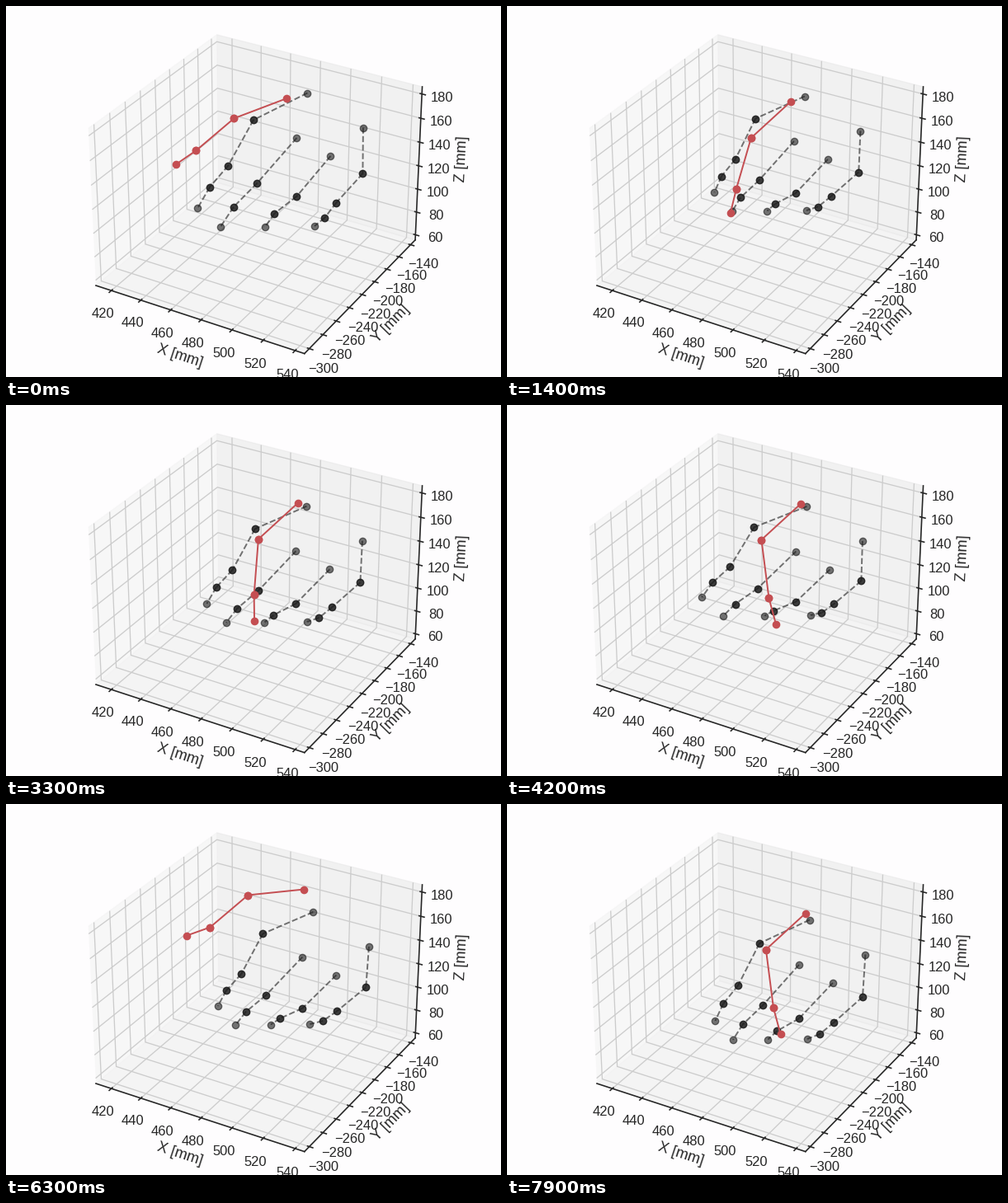
Write a matplotlib script that moves like this. It is 600 px wide and 450 px high and loops after 8 s.

```python
import numpy as np
import matplotlib.pyplot as plt
from matplotlib.animation import FuncAnimation

INK = "0.15"
SCALE = 1.15
plt.rcParams.update({
    "font.family": "Liberation Sans", "text.color": INK,
    "axes.labelcolor": INK, "axes.edgecolor": INK,
    "xtick.color": INK, "ytick.color": INK,
    "axes.linewidth": 1.25, "xtick.major.width": 1.25, "ytick.major.width": 1.25,
    "grid.color": "0.8", "grid.linewidth": 1, "grid.linestyle": "-",
    "axes.labelsize": 12 * SCALE,
    "xtick.labelsize": 11 * SCALE, "ytick.labelsize": 11 * SCALE,
})

W, H, DPI = 600, 450, 93.75
FRAMES, STEP, BEAT = 80, 100, 900

# Rest shape of each finger, knuckle to tip, as x + y*1j in pixels,
# with the direction its tip moves when the hand spreads.
FINGERS = [
    ([366 + 122.5j, 305 + 152j, 279 + 204j, 261 + 227j, 251 + 249j], -1.5),
    ([353 + 177j, 309 + 227.5j, 284.5 + 252j, 272.5 + 272j], -1),
    ([394 + 199j, 353 + 243.5j, 326 + 260j, 315 + 271.5j], 0),
    ([433.5 + 164.5j, 430 + 217j, 395 + 249j, 378 + 264j, 362.5 + 271j], 1),
]

# Slow drift of the hand: time, knuckle shift, tip shift, spread, thumb root.
DRIFT = np.array([
    (0, -6 - 13j, -6, 12, 337 + 128j),
    (1400, -4.5 - 13j, 1 - 23j, 0, 344.5 + 116j),
    (2400, 0, 0, 0, 352 + 118j),
    (4200, -2 + 0.5j, -2 - 16j, 8, 357 + 119.5j),
    (5400, -3 + 13.5j, 3j, 0, 353.5 + 121j),
    (6300, 1 + 12.5j, 0.5, 0, 358 + 119.5j),
    (7900, 1.5 + 18j, 2 + 14j, 0, 362.5 + 132.5j),
])

# Thumb bones as log vectors, so they turn instead of shrinking.
OPEN = np.log([-68 + 7j, -46 + 39j, -28 + 10j])
BENT = np.log([-48 + 44j, -18 + 62j, -7 + 29j])
DROOP = np.array([-0.26j, 0, -0.26j])
FLEX = np.array([0, 0.1 - 0.41j, 0.1 - 0.5j])


def smooth(x):
    x = np.clip(x, 0, 1)
    return x * x * (3 - 2 * x)


def curl(t):
    p = t % BEAT / BEAT
    return smooth((p - 0.08) / 0.42) * (1 - smooth((p - 0.78) / 0.22))


def pose(t):
    """Joints of the four fingers, then of the thumb."""
    root, tip, spread, base = (np.interp(t, DRIFT[:, 0].real, col)
                               for col in DRIFT[:, 1:].T)
    bend = curl(t)
    lift = 1 - bend
    chains = []
    for shape, side in FINGERS:
        s = np.linspace(0, 1, len(shape))
        shift = root + (tip + spread * side - root) * s
        chains.append(np.array(shape) + shift + lift * (6 - 4j))
    opened = OPEN + DROOP * max(0, 1 - t / 5400)
    bent = BENT + FLEX * smooth((t - 2400) / 1800)
    bones = np.exp(opened * lift + bent * bend)
    chains.append(np.cumsum(np.r_[base + lift * (4 - 16j), bones]))
    return chains


fig = plt.figure(figsize=(W / DPI, H / DPI), dpi=DPI, facecolor="#fefdfe")
ax = fig.add_axes([0, 0, 1, 1], projection="3d", facecolor="none")
ax.set(xlim=(409.4, 545.8), ylim=(-307, -132), zlim=(55.4, 185.9),
       xlabel="X [mm]", ylabel="Y [mm]", zlabel="Z [mm]")
ax.set_xticks(range(420, 541, 20))
ax.set_yticks(range(-300, -139, 20))
ax.set_zticks(range(60, 181, 20))

top = fig.add_axes([0, 0, 1, 1])
top.set(xlim=(0.6, W + 0.6), ylim=(H, 0))
top.axis("off")

DARK = dict(color="#1a1a1a", ls="--", alpha=0.6)
RED = dict(color="#c44e52", ls="-")


def segments(count, style):
    # One line per bone, so inner joints overlap and look darker.
    return [top.plot([], [], marker="o", ms=6.4, lw=1.5, **style)[0]
            for _ in range(count)]


hand = [segments(len(shape) - 1, DARK) for shape, _ in FINGERS]
hand.append(segments(len(OPEN), RED))


def draw(i):
    for lines, z in zip(hand, pose(i * STEP)):
        for k, line in enumerate(lines):
            line.set_data(z[k:k + 2].real, z[k:k + 2].imag)
    return [line for lines in hand for line in lines]


anim = FuncAnimation(fig, draw, frames=FRAMES, interval=STEP, repeat=True,
                     repeat_delay=0, blit=False)
plt.show()
```
